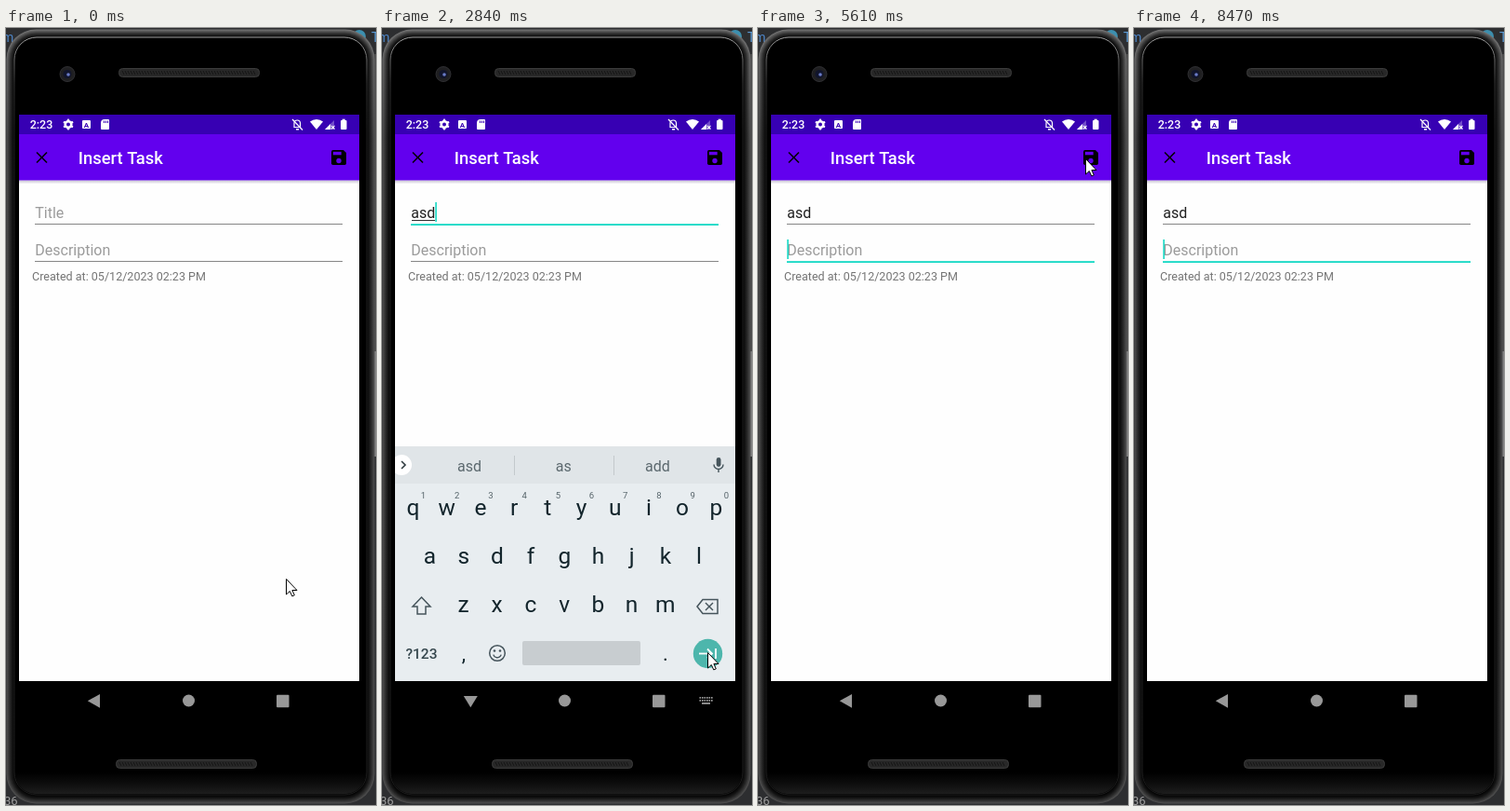
An HTML page with a canvas that plays this animation: 398x834 px, repeating every 8.49 s.

```html
<!DOCTYPE html>
<html lang="en">
<head>
<meta charset="utf-8">
<title>Insert Task</title>
<style>
html, body { margin: 0; width: 100%; height: 100%; overflow: hidden; background: #2b2b2b; }
canvas { display: block; }
</style>
</head>
<body>
<canvas id="stage" width="398" height="834"></canvas>
<script>
const ctx = document.getElementById('stage').getContext('2d');
const LOOP = 8490;
const STEP = 122;
const BLINK = 488;
const TEAL = '#14d8c4';
const PURPLE = '#6200ee';
const INDIGO = '#3700b3';
const KEY_INK = '#13252c';
const ICON_INK = '#45545b';

// Where the pointer rests, and when it travels there
const STOPS = [
  { x: 301, y: 591, leave: 0, arrive: 0 },
  { x: 156, y: 202, leave: 140, arrive: 500 },
  { x: 122, y: 329, leave: 1600, arrive: 1990 },
  { x: 350, y: 670, leave: 2420, arrive: 2820 },
  { x: 102, y: 725, leave: 2950, arrive: 3350 },
  { x: 172, y: 510, leave: 4280, arrive: 4520 },
  { x: 352, y: 140, leave: 4790, arrive: 5500 },
  { x: 228, y: 674, leave: 6280, arrive: 6720 },
  { x: 303, y: 690, leave: 7110, arrive: 7950 },
  { x: 333, y: 807, leave: 8200, arrive: 8340 }
];
const SUGGESTIONS = ['thanks I we', 'a and as', 'as assignment ask', 'asd as add'];

const clamp = (v, lo, hi) => Math.min(hi, Math.max(lo, v));
const ease = p => p * p * (3 - 2 * p);
const blink = (t, phase) => Math.floor((t - phase) / BLINK) % 2 === 0;
const typedCount = t => clamp(Math.floor((t - 1240) / 120), 0, 3);

function rect(x, y, w, h, color) {
  ctx.fillStyle = color;
  ctx.fillRect(x, y, w, h);
}

function paint(fill, stroke, width) {
  if (fill) { ctx.fillStyle = fill; ctx.fill(); }
  if (stroke) { ctx.strokeStyle = stroke; ctx.lineWidth = width; ctx.stroke(); }
}

function round(x, y, w, h, r, fill, stroke, width = 1) {
  ctx.beginPath();
  ctx.roundRect(x, y, w, h, r);
  paint(fill, stroke, width);
}

function arc(x, y, r, from, to, fill, stroke, width = 1) {
  ctx.beginPath();
  ctx.arc(x, y, r, from, to);
  paint(fill, stroke, width);
}

const disc = (x, y, r, fill, stroke, width) => arc(x, y, r, 0, Math.PI * 2, fill, stroke, width);

function poly(points, fill, stroke, width = 1, close = true) {
  ctx.beginPath();
  points.forEach(([x, y]) => ctx.lineTo(x, y));
  if (close) ctx.closePath();
  paint(fill, stroke, width);
}

const line = (points, color, width) => poly(points, null, color, width, false);

function cross(x, y, r, color, width) {
  line([[x - r, y - r], [x + r, y + r]], color, width);
  line([[x + r, y - r], [x - r, y + r]], color, width);
}

// Open arrowhead; dir 1 points right, -1 left
const chevron = (x, y, r, dir, color, width) =>
  line([[x - r * dir, y - r], [x, y], [x - r * dir, y + r]], color, width);

function text(str, x, y, size, color, align = 'left', weight = 400) {
  ctx.font = `${weight} ${size}px Roboto, sans-serif`;
  ctx.textAlign = align;
  ctx.fillStyle = color;
  ctx.fillText(str, x, y);
}

function fade(y0, y1, ...colors) {
  const g = ctx.createLinearGradient(0, y0, 0, y1);
  colors.forEach((c, i) => g.addColorStop(i / (colors.length - 1), c));
  return g;
}

function speaker(x, y) {
  round(x + 0.5, y + 0.5, 151, 9, 4, '#282828', '#3c3c3c');
  for (let i = 4; i < 148; i += 3) line([[x + i, y + 3], [x + i + 2, y + 7]], '#141414', 1);
}

function drawPhone() {
  rect(0, 0, 398, 834, '#2d2e30');
  text('m', -4, 15, 14, '#4e86c8');
  disc(380, 9, 7, '#3d8fae');
  text('T', 393, 15, 14, '#5b9bd5');
  text('36', -2, 834, 13, '#a0a0a0');
  rect(396, 28, 2, 432, '#4c4c4c');
  rect(396, 347, 2, 113, '#808080');

  // Rim: nested outlines falling off from grey to black
  for (let i = 0; i < 9; i++) {
    const shade = 74 * (1 - i / 9) ** 1.5 + 3;
    const top = shade * 1.5;
    const tone = v => `rgb(${v},${v},${v})`;
    round(0.5 + i, 1.5 + i, 396 - 2 * i, 831 - 2 * i, 32 - i, fade(0, 120, tone(top), tone(shade)));
  }
  round(9, 10, 379, 813, 24, '#000', fade(10, 110, '#a0a0a0', '#303030', '#1c1c1c'));
  round(10, 799, 377, 23, [0, 0, 22, 22], fade(799, 822, '#000', '#0d0d0d', '#1d1d1d'));

  speaker(121, 43);
  speaker(118, 785);
  disc(66, 49.5, 8, '#1f1f21', '#303033');
  disc(66, 49.5, 4.5, '#11152c');
  disc(67, 50, 1.8, '#6a7cc8');
}

function drawStatusIcons() {
  const white = '#fff';
  disc(67, 103.5, 3.3, null, white, 2.6);
  for (let i = 0; i < 6; i++) {
    const a = (i + 0.5) * Math.PI / 3;
    disc(67 + 4.7 * Math.cos(a), 103.5 + 4.7 * Math.sin(a), 1.2, white);
  }
  round(82, 99, 9, 9, 1, white);
  text('A', 86.5, 106.5, 8, INDIGO, 'center', 700);
  round(102, 98, 9, 11, [4, 1, 1, 1], white);
  for (let x = 105; x < 110; x += 2) rect(x, 99.5, 1, 2.5, INDIGO);

  round(310, 99, 6.5, 7.5, [3.2, 3.2, 0, 0], null, white, 1.2);
  rect(312, 108, 3, 1.5, white);
  line([[308, 98], [319, 109.5]], white, 1.2);
  ctx.beginPath();
  ctx.moveTo(334, 109);
  ctx.arc(334, 109, 11, -Math.PI * 0.72, -Math.PI * 0.28);
  ctx.closePath();
  paint(white);
  poly([[343, 109], [353, 99], [353, 109]], 'rgba(255,255,255,.3)');
  poly([[343, 109], [349, 103], [349, 109]], white);
  cross(351.7, 106.7, 1.8, white, 1.1);
  round(360, 99, 6.5, 10, 1, white);
  rect(361.7, 97.7, 3, 2, white);
}

function drawAppBar(t) {
  rect(14, 93, 366, 21, INDIGO);
  rect(14, 163.5, 366, 4, fade(163.5, 167.5, '#c8c4d2', '#fefefe'));
  rect(14, 114, 366, 49.5, PURPLE);
  text('2:23', 25.7, 108, 12.5, '#fff', 'left', 500);
  drawStatusIcons();
  text('Insert Task', 77.8, 146, 18.4, '#fff', 'left', 500);
  cross(38.5, 139, 5.5, '#000', 1.6);

  if (t >= 6010 && t < 6400) disc(358, 139, 12 + 6 * ease(clamp((t - 6010) / 250, 0, 1)), 'rgba(255,255,255,.18)');
  round(350, 131, 16, 16, 1.7, '#000');
  poly([[362.4, 130.5], [366.5, 130.5], [366.5, 134.6]], PURPLE);
  rect(351.8, 132.8, 8.9, 3.5, PURPLE);
  disc(358, 142.5, 2.7, PURPLE);
}

function drawField(y, value, hint, focused, caretOn) {
  text(value || hint, 31.3, y, 16, value ? '#202020' : '#9b9b9b');
  const width = ctx.measureText(value).width;
  if (!focused) return rect(31, y + 6, 331, 1, '#868686');
  if (value) rect(32, y + 2, width - 1, 1, '#303030');
  rect(31, y + 6.2, 331, 1.8, TEAL);
  if (caretOn) rect(31.3 + width, y - 17, 1.6, 21, TEAL);
}

function drawForm(t) {
  const inDescription = t >= 2950;
  drawField(204, 'asd'.slice(0, typedCount(t)), 'Title', t >= 780 && !inDescription, blink(t, 1480));
  drawField(244, '', 'Description', inDescription, blink(t, 4280));
  text('Created at: 05/12/2023 02:23 PM', 28, 271.3, 12.55, '#757575');
}

function keyRow(letters, x, y, size = 24.5, ink = KEY_INK) {
  [...letters].forEach((c, i) => text(c, x + i * 36.2, y, size, ink, 'center'));
}

function drawSuggestions(t) {
  const words = SUGGESTIONS[t < 2950 ? typedCount(t) : 0].split(' ');
  rect(14, 449, 366, 40, '#e0e5e8');
  words.forEach((w, i) => text(w, 94 + i * 101.2, 475.5, 16, '#5b686e', 'center'));
  rect(142, 459, 1, 21, '#c3c9cc');
  rect(249, 459, 1, 21, '#c3c9cc');
  disc(21, 469, 11, '#fff');
  chevron(25, 469, 4, 1, '#303c41', 1.6);
  round(359.7, 461, 4.8, 10, 2.4, ICON_INK);
  arc(362, 468.5, 5, 0, Math.PI, null, ICON_INK, 1.4);
  rect(361.3, 473, 1.4, 4, ICON_INK);
}

function drawActionKey(isNext) {
  disc(350.5, 671.5, 15.7, '#4db6ac');
  if (isNext) {
    line([[341, 671.5], [355, 671.5]], '#fff', 1.8);
    chevron(355, 671.5, 5, 1, '#fff', 1.8);
    rect(358.1, 666, 1.8, 11, '#fff');
  } else {
    line([[359, 667], [359, 672], [343, 672]], '#fff', 1.8);
    chevron(343, 672, 4.5, -1, '#fff', 1.8);
  }
}

function drawKeyboard(t) {
  if (t < 1020 || t >= 4280) return;
  ctx.save();
  ctx.translate(0, 252 * (1 - ease(clamp((t - 900) / 240, 0, 1))));
  rect(14, 449, 366, 252, '#e8edf0');
  drawSuggestions(t);
  keyRow('qwertyuiop', 33.5, 523);
  keyRow('1234567890', 44.5, 505, 9.5, '#56646a');
  keyRow('asdfghjkl', 51.5, 575);
  keyRow('zxcvbnm', 87.5, 627);

  poly([[42.5, 611], [52, 621], [47, 621], [47, 629], [38, 629], [38, 621], [33, 621]], null, ICON_INK, 1.5);
  poly([[339, 621], [345, 613.5], [361, 613.5], [361, 628.5], [345, 628.5]], null, ICON_INK, 1.5);
  cross(352, 621, 4, ICON_INK, 1.5);

  text('?123', 42.5, 677, 15.5, '#35464d', 'center', 500);
  text(',', 88, 679, 22, KEY_INK, 'center');
  text('.', 305, 679, 22, KEY_INK, 'center');
  disc(124, 671, 8.3, null, ICON_INK, 1.5);
  disc(121, 668.5, 1.3, ICON_INK);
  disc(127, 668.5, 1.3, ICON_INK);
  arc(124, 671.5, 4.3, 0.25, Math.PI - 0.25, null, ICON_INK, 1.4);
  round(151, 658, 127, 26, 2, '#c8cdd0');
  drawActionKey(t < 2950);
  ctx.restore();
}

function drawToast(t) {
  ctx.save();
  ctx.globalAlpha = clamp((t - 6200) / 200, 0, 1) * clamp((8200 - t) / 200, 0, 1);
  round(113.5, 636, 165.5, 44, 22, '#eee');
  text('Please enter new task', 196.5, 662.5, 12.5, '#202020', 'center');
  ctx.restore();
}

function drawNavigation(t) {
  const color = t >= 6270 && t < 7950 ? '#eee' : '#989898';
  if (t >= 4280 && t < 4520) round(51, 701, 88, 43, 21, '#161616');
  if (t >= 900 && t < 4400) {
    poly([[87.8, 717], [102.8, 717], [95.3, 729.3]], color);
    for (let i = 0; i < 12; i++) rect(341.5 + (i % 6) * 2.5, i < 6 ? 718 : 721, 1.6, 1.8, color);
    rect(344, 724, 9, 1.8, color);
  } else {
    poly([[87.8, 722.3], [101, 715], [101, 729.7]], color);
  }
  disc(196.5, 722, 6.5, color);
  round(291, 715.7, 13.5, 13.5, 1, color);
}

function pointerAt(t) {
  const next = STOPS.findLastIndex(stop => stop.leave <= t);
  const from = STOPS[Math.max(0, next - 1)];
  const to = STOPS[next];
  const span = to.arrive - to.leave;
  const steps = Math.round(span / STEP);
  const done = steps ? Math.floor((t - to.leave) / span * steps) + 1 : 1;
  const p = ease(Math.min(1, done / (steps + 1)));
  return [from.x + (to.x - from.x) * p, from.y + (to.y - from.y) * p];
}

function drawPointer(t) {
  if (t >= 8470) return;
  const [x, y] = pointerAt(t).map(Math.round);
  const shape = [[0, 0], [0, 16.5], [3.8, 13], [6.3, 18.4], [8.8, 17.3], [6.4, 12], [11.5, 12]];
  poly(shape.map(([dx, dy]) => [x + 0.5 + dx, y + 0.5 + dy]), '#fff', '#000');
}

function draw(t) {
  drawPhone();
  ctx.save();
  ctx.beginPath();
  ctx.rect(14, 93, 366, 608);
  ctx.clip();
  rect(14, 93, 366, 608, '#fefefe');
  drawAppBar(t);
  drawForm(t);
  drawKeyboard(t);
  drawToast(t);
  ctx.restore();
  drawNavigation(t);
  drawPointer(t);
}

const start = performance.now();
function tick() {
  draw((performance.now() - start) % LOOP);
  requestAnimationFrame(tick);
}
tick();
</script>
</body>
</html>
```
